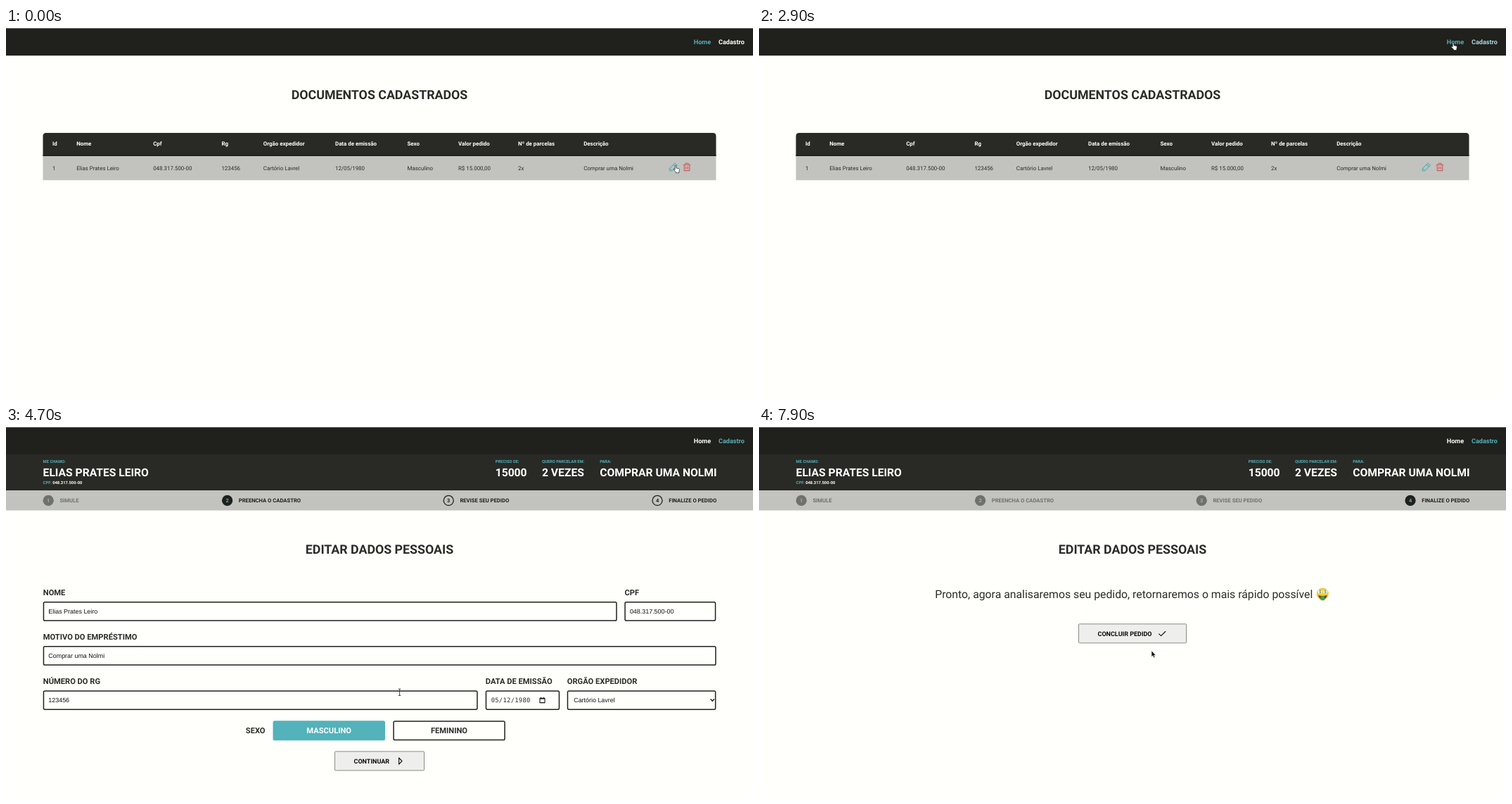
These frames come from a looping animation (1062x527 px, 8 s). An HTML page:

```html
<!DOCTYPE html>
<html lang="pt-BR">
<head>
<meta charset="utf-8">
<title>Documentos cadastrados</title>
<style>
  html, body { margin: 0; width: 100%; height: 100%; overflow: hidden; background: #fffffc; }
  svg { display: block; width: 100%; height: 100%; }
  text { font-family: Roboto, sans-serif; fill: #2b2b28; text-rendering: geometricPrecision; }
  .b { font-weight: 700; }
  .form { font-family: "Liberation Sans", Arial, sans-serif; }
  .mono { font-family: "DejaVu Sans Mono", monospace; }
</style>
</head>
<body>
<svg id="stage" viewBox="0 0 1062 527" xmlns="http://www.w3.org/2000/svg"></svg>
<script>
const LOOP = 8000, TICK = 100;
const INK = '#20201c', DARK = '#292925', GREY = '#c2c2be', TEAL = '#53b2ba', PAPER = '#fffffc';
const person = { name: 'Elias Prates Leiro', cpf: '048.317.500-00', rg: '123456', office: 'Cartório Lavrel', goal: 'Comprar uma Nolmi' };

// Text is placed by the vertical middle of its capitals.
const text = (x, mid, size, str, attrs = '') =>
  `<text x="${x}" y="${mid + size * 0.355}" font-size="${size}" ${attrs}>${str}</text>`;
const bold = (x, mid, size, str, fill = '#2b2b28', attrs = '') =>
  text(x, mid, size, str, `class="b" style="fill:${fill}" ${attrs}`);
const rect = (x, y, w, h, fill, attrs = '') =>
  `<rect x="${x}" y="${y}" width="${w}" height="${h}" fill="${fill}" ${attrs}/>`;
const line = (d, stroke, width = 1) =>
  `<path d="${d}" fill="none" stroke="${stroke}" stroke-width="${width}" stroke-linejoin="round" stroke-linecap="round"/>`;
const title = (mid, str) => bold(531, mid, 17.8, str, '#2b2b28', 'text-anchor="middle"');
const label = (x, mid, str) => bold(x, mid, 11.15, str);
const entry = (x, mid, str, fill = '#111') =>
  text(x, mid, 8.93, str, `class="form" style="fill:${fill}"`);
const box = (x, y, w) =>
  rect(x + 0.75, y + 0.75, w - 1.5, 26.2, PAPER, `stroke="${INK}" stroke-width="1.5" rx="1.8"`);

function field(x, y, w, name, value, fill) {
  return label(x - 0.2, y - 13.4, name) + box(x - 0.3, y, w) + entry(x + 7.3, y + 13.6, value, fill);
}

function button(x, y, w, str, icon, off) {
  const face = rect(x + 0.5, y + 0.5, w - 1, 27, '#eeeeec',
    `class="face" stroke="${off ? '#d2d2cf' : '#8b8b88'}" rx="1"`);
  return `<g>${face}<g opacity="${off ? 0.35 : 1}">` +
    bold(x + 27.5, y + 14.3, 9, str, '#0b0b0a') + line(icon, '#0b0b0a', 1.1) + '</g></g>';
}
const next = (y, off) => button(467, y, 128, 'CONTINUAR', `M558.6 ${y + 9.5}V${y + 18.7}L563 ${y + 14.1}Z`, off);

function steps(y, current) {
  const items = [[60.2, 'SIMULE'], [314.6, 'PREENCHA O CADASTRO'], [629.2, 'REVISE SEU PEDIDO'], [926, 'FINALIZE O PEDIDO']];
  return rect(0, y, 1062, 28.5, GREY) + items.map(([x, str], i) => {
    const n = i + 1, full = n <= current, mid = y + 14.4;
    return `<g opacity="${n < current ? 0.5 : 1}">` +
      `<circle cx="${x}" cy="${mid}" r="7" fill="${full ? INK : 'none'}" stroke="${INK}" stroke-width="1.3"/>` +
      bold(x, mid, 7.4, n, full ? TEAL : INK, 'text-anchor="middle"') +
      bold(x + 16.2, mid, 7.65, str, INK) + '</g>';
  }).join('');
}

function summary() {
  const items = [[52.6, 'ME CHAMO:', person.name.toUpperCase()], [695.7, 'PRECISO DE:', '15000'],
    [762, 'QUERO PARCELAR EM:', '2 VEZES'], [844.2, 'PARA:', person.goal.toUpperCase()]];
  return rect(0, 39, 1062, 51, DARK) +
    items.map(([x, small, big]) => bold(x, 49.4, 5.8, small, TEAL) + bold(x, 64.4, 15.65, big, '#fff')).join('') +
    bold(52.6, 79.3, 5.8, 'CPF:', TEAL) + bold(66.2, 79.3, 5.8, person.cpf, '#fff');
}

function tablePage() {
  const cols = [[66, 'Id', '1'], [100.2, 'Nome', person.name], [209.2, 'Cpf', person.cpf], [306.4, 'Rg', person.rg],
    [365.8, 'Orgão expedidor', person.office], [468, 'Data de emissão', '12/05/1980'], [570.5, 'Sexo', 'Masculino'],
    [643, 'Valor pedido', 'R$ 15.000,00'], [728, 'Nº de parcelas', '2x'], [821.2, 'Descrição', person.goal]];
  const pencil = '<g transform="translate(940.8 190) scale(.06)">' +
    line('M93 216H48a8 8 0 0 1-8-8V163l122-125a8 8 0 0 1 12 0l45 45a8 8 0 0 1 0 11ZM136 64l56 56M45 160l51 51', TEAL, 18) + '</g>';
  const bin = line('M963.2 194.2H972.8M966 194V192.3H970V194M964.2 194.4V202.6H971.8V194.4M966.7 196.8V200.3M969.3 196.8V200.3', '#cb5a57', 1.1);
  return title(94.3, 'DOCUMENTOS CADASTRADOS') +
    `<path d="M52.5 182V153.5Q52.5 149 57 149H1005Q1009.5 149 1009.5 153.5V182Z" fill="${DARK}"/>` +
    rect(52.5, 180.4, 957, 1.6, '#1c1c19') + rect(52.5, 182, 957, 34.2, GREY) +
    cols.map(([x, head, cell]) => bold(x, 163.9, 7.9, head, '#fff') + text(x, 198.8, 7.9, cell)).join('') + pencil + bin;
}

function amountForm(dy, values, fill, off) {
  return field(53, 197.5 + dy, 957, 'VALOR', values[0], fill) +
    field(53, 260.7 + dy, 957, 'PARCELAS', values[1], fill) + next(304 + dy, off);
}

const editing = n => summary() + steps(90, n) + title(173.5, 'EDITAR DADOS PESSOAIS');

function personForm() {
  const choice = (x, str, on) =>
    rect(x + 0.75, 418, 158, 26.5, on ? TEAL : PAPER, `stroke="${on ? TEAL : INK}" stroke-width="1.5" rx="1.8"`) +
    bold(x + 79.7, 431.2, 11.15, str, on ? '#fff' : '#2b2b28', 'text-anchor="middle"');
  return editing(2) +
    field(53, 248, 816, 'NOME', person.name) + field(879.6, 248, 130, 'CPF', person.cpf) +
    field(53, 311, 957, 'MOTIVO DO EMPRÉSTIMO', person.goal) +
    field(53, 374.2, 618, 'NÚMERO DO RG', person.rg) + field(682, 374.2, 105.5, 'DATA DE EMISSÃO', '') +
    text(689.7, 388.2, 8.9, '05/12/1980', 'class="mono" letter-spacing=".25"') +
    line('M759 385.4H766V391.6H759ZM759 386H766M760.5 384.3V385M764.5 384.3V385', '#111', 1.1) +
    field(798, 374.2, 211.7, 'ORGÃO EXPEDIDOR', '') + entry(807.2, 388, person.office) +
    line('M1002 386.8L1004.3 389.3L1006.6 386.8', '#111', 1.3) +
    label(340.8, 431.4, 'SEXO') + choice(379.5, 'MASCULINO', true) + choice(550.3, 'FEMININO') + next(460.4);
}

function review() {
  const row = (x, i, key, value) =>
    text(x, 233.4 + i * 23.8, 9, `<tspan class="b">${key}:</tspan> ${value}`);
  const left = [['Nome', person.name], ['Cpf', person.cpf], ['Rg', person.rg], ['Data de emissão', '04/12/1980'], ['Sexo', 'Masculino']];
  const right = [['Valor', 'R$ 15.000,00'], ['Parcelas', '2'], ['Descrição', person.goal]];
  return editing(3) + left.map((r, i) => row(395.6, i, ...r)).join('') +
    right.map((r, i) => row(540.2, i, ...r)).join('') + next(366.8);
}

function finish() {
  const eye = x => `<circle cx="${x}" cy="234" r="3" fill="#fff"/>` +
    bold(x, 234, 6.2, '$', '#2e8b45', 'text-anchor="middle"');
  const face = '<circle cx="801.3" cy="237" r="8.6" fill="#fcc62c"/>' + eye(797.7) + eye(805) +
    '<path d="M795 239Q801.3 241 807.6 239Q806.5 244.5 801.3 244.5Q796 244.5 795 239Z" fill="#5f4328"/>' +
    rect(798.5, 240.2, 5.6, 6, '#3fa452', 'rx=".8"');
  return editing(4) +
    text(250.2, 237.2, 15.8, 'Pronto, agora analisaremos seu pedido, retornaremos o mais rápido possível') +
    face + button(454, 279.3, 154, 'CONCLUIR PEDIDO', 'M568.6 293.8L571.6 296.7L577.8 290.5');
}

// Hit areas: [x, y, right, bottom]
const NAV = { Home: [977, 14, 1003, 27], Cadastro: [1012, 13, 1050, 27] };
const pages = {
  table: { art: tablePage(), home: true, hands: [[942, 191, 974, 206]] },
  amount: { art: steps(39, 1) + title(123.3, 'DADOS PESSOAIS') +
    amountForm(0, ['Digite um valor', 'Digite a quantidade de parcelas'], '#757575', true) },
  editAmount: { art: editing(1) + amountForm(50.4, ['15000', '2']), face: [467, 354, 595, 382],
    beams: [[53, 248, 1010, 275], [53, 311, 1010, 338]] },
  person: { art: personForm(), face: [467, 461, 595, 488], hands: [[380, 418, 539, 445], [551, 418, 710, 445]],
    beams: [[53, 248, 1010, 275], [53, 311, 1010, 338], [53, 374, 787, 402]] },
  review: { art: review(), face: [467, 367, 595, 395] },
  finish: { art: finish(), face: [454, 280, 608, 307] }
};
const visits = [[0, 'table'], [2100, 'amount'], [2900, 'table'], [3800, 'editAmount'],
  [4600, 'person'], [5800, 'review'], [7200, 'finish']];

// Pointer path: [time, x, y]
const path = [[0, 952, 195], [1200, 952, 195], [1500, 986, 110], [1800, 1032, 9], [1900, 1040, 14], [2000, 1040, 16],
  [2100, 1040, 16], [2300, 990, 19], [2400, 986.5, 20], [2500, 986.5, 20], [2600, 987, 20.7], [3200, 987, 20.7],
  [3600, 953, 188], [3700, 950, 195], [3800, 940, 199], [4100, 612, 349], [4400, 559.5, 375.5], [4900, 559.5, 376],
  [5200, 546, 425], [5500, 540, 474], [6200, 540, 474], [6400, 529, 390], [6500, 528.4, 382], [6600, 528.4, 382],
  [6900, 534, 383], [7600, 534, 383], [7900, 558, 317.8], [8000, 558, 317.8]];

const shapes = {
  hand: '<path transform="translate(-3.4 0)" d="M2.5 6.3V1.1a.9.9 0 0 1 1.8 0V4l3.2.6q1.4.4 1.3 1.8L8.2 9.2V10.8H3.9V9.6L.6 6.6Q.2 5.5 1.2 5.3Z" fill="#fff" stroke="#222" stroke-width=".7"/>',
  arrow: '<path d="M0 0V8.7L2 6.9L3.4 10L4.9 9.4L3.5 6.4H6.2Z" fill="#161616" stroke="#fff" stroke-width=".5"/>',
  beam: '<path d="M-1.6 -3.6H1.8M-1.6 5.6H1.8M.1 -3.6V5.6" fill="none" stroke="#333" stroke-width=".9"/>'
};

const group = (id, inner) => `<g id="${id}">${inner}</g>`;
const stage = document.getElementById('stage');
stage.innerHTML = rect(0, 0, 1062, 527, PAPER) + rect(0, 0, 1062, 39.2, INK) + rect(0, 0, 1062, 0.8, '#8d8d8a') +
  bold(977.8, 19.7, 9.1, 'Home', '#fff', 'id="Home"') + bold(1013, 19.7, 9.1, 'Cadastro', '#fff', 'id="Cadastro"') +
  Object.entries(pages).map(([id, p]) => group(id, p.art)).join('') +
  group('pointer', Object.entries(shapes).map(([id, s]) => group(id, s)).join(''));
const el = id => document.getElementById(id);
const show = (id, on) => { el(id).style.display = on ? '' : 'none'; };

const inside = ([x, y], [l, t, r, b]) => x >= l && x <= r && y >= t && y <= b;
const pageAt = t => visits.filter(v => v[0] <= t).pop()[1];

function pointerAt(t) {
  const i = Math.max(1, path.findIndex(k => k[0] > t));
  const [t0, x0, y0] = path[i - 1], [t1, x1, y1] = path[i];
  const k = (t - t0) / (t1 - t0);
  return [x0 + (x1 - x0) * k, y0 + (y1 - y0) * k];
}

function isLit(name, t) {
  const active = Boolean(pages[pageAt(t)].home) === (name === 'Home');
  return active || inside(pointerAt(t), NAV[name]) ? 1 : 0;
}

function draw(t) {
  const id = pageAt(t), page = pages[id], at = pointerAt(t);
  const over = areas => (areas || []).some(a => inside(at, a));
  Object.keys(pages).forEach(p => show(p, p === id));

  // Link colours fade over two ticks.
  for (const name in NAV) {
    const k = (isLit(name, t) + isLit(name, Math.max(0, t - TICK))) / 2;
    const mix = [83, 178, 186].map(c => Math.round(255 + (c - 255) * k));
    el(name).style.fill = `rgb(${mix})`;
  }

  const hot = page.face && inside(at, page.face);
  if (page.face) {
    const face = el(id).querySelector('.face');
    face.setAttribute('fill', hot ? '#e2e4e0' : '#eeeeec');
    face.setAttribute('stroke', hot ? '#555552' : '#8b8b88');
  }

  const kind = hot || over(page.hands) || over(Object.values(NAV)) ? 'hand' : over(page.beams) ? 'beam' : 'arrow';
  Object.keys(shapes).forEach(s => show(s, s === kind));
  el('pointer').setAttribute('transform', `translate(${at})`);
}

const start = performance.now();
function frame() {
  const t = (performance.now() - start) % LOOP;
  draw(Math.floor(t / TICK) * TICK);
  requestAnimationFrame(frame);
}
frame();
</script>
</body>
</html>
```
